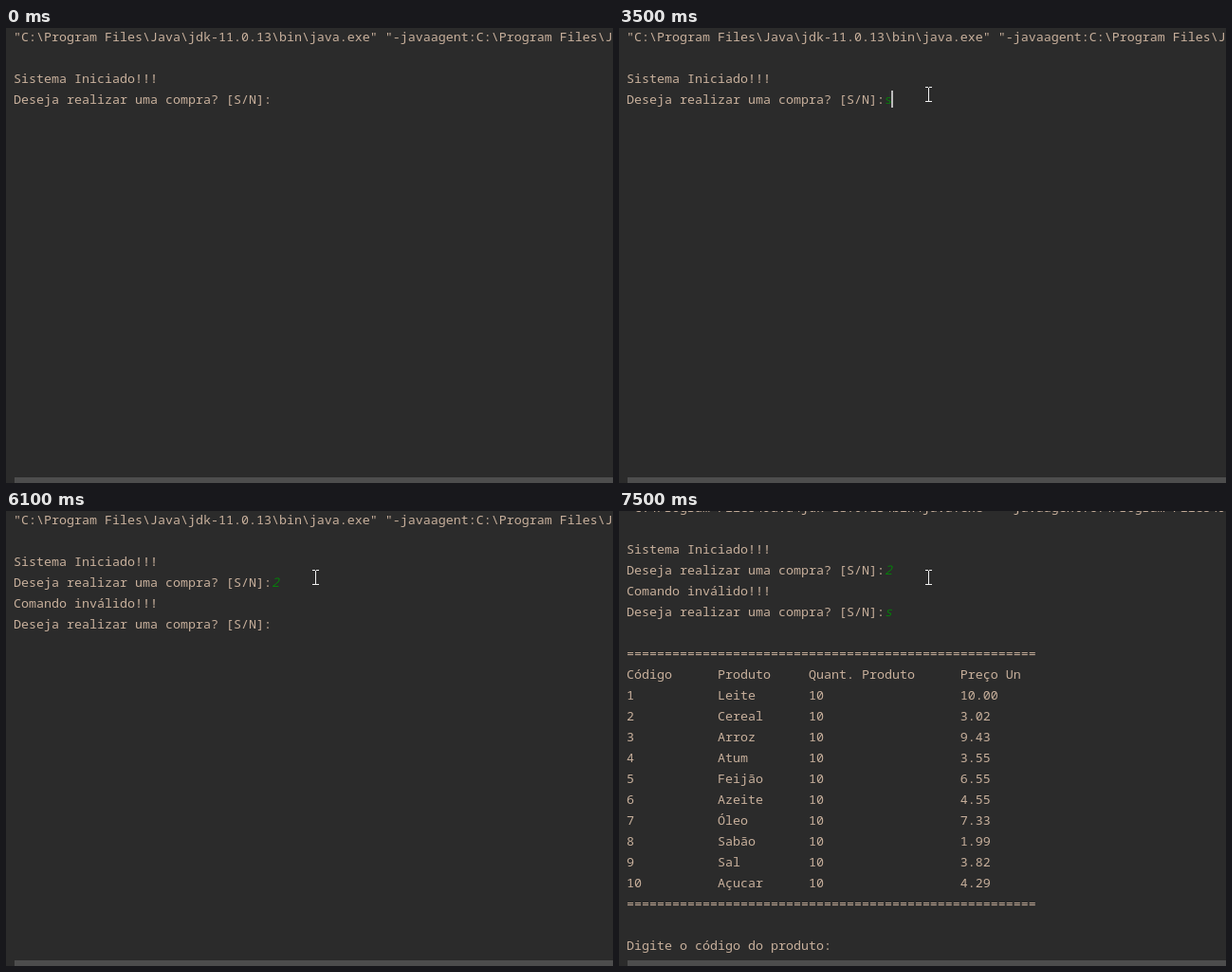
An HTML page with a canvas for the animation above (8000 ms loop, 640x480 px).

```html
<!DOCTYPE html>
<html lang="pt">
<head>
<meta charset="utf-8">
<style>
html, body { margin: 0; width: 100%; height: 100%; overflow: hidden; background: #2b2b2b; }
canvas { display: block; }
</style>
</head>
<body>
<canvas id="stage" width="640" height="480"></canvas>
<script>
const ctx = document.getElementById('stage').getContext('2d', { alpha: false });
const LOOP = 8000, CELL = 8, ROW = 22;
const FONT = '13.3333px "Noto Sans Mono", "DejaVu Sans Mono", monospace';
const ASK = 'Deseja realizar uma compra? [S/N]:';
const RULE = '='.repeat(54);
const columns = (a, b, c, d) => a.padEnd(12) + b.padEnd(12) + c.padEnd(20) + d;

const products = [
  ['Leite', '10.00'], ['Cereal', '3.02'], ['Arroz', '9.43'], ['Atum', '3.55'], ['Feijão', '6.55'],
  ['Azeite', '4.55'], ['Óleo', '7.33'], ['Sabão', '1.99'], ['Sal', '3.82'], ['Açucar', '4.29']
];
const lines = [
  '"C:\\Program Files\\Java\\jdk-11.0.13\\bin\\java.exe" "-javaagent:C:\\Program Files\\J',
  '', 'Sistema Iniciado!!!', ASK, 'Comando inválido!!!', ASK, '', RULE,
  columns('Código', 'Produto', 'Quant. Produto', 'Preço Un'),
  ...products.map(([name, price], i) => columns(String(i + 1), name, '10', price)),
  RULE, '', 'Digite o código do produto: '
];

// [start, printed lines, first answer, second answer, caret row, caret column (-1 = hidden)]
const states = [
  [0, 4, '', '', 3, -1],
  [900, 4, '', '', 3, 34],
  [1400, 4, '', '', 3, -1],
  [1800, 4, '', '', 3, 34],
  [2000, 4, 's', '', 3, 35],
  [2900, 4, 's', '', 3, -1],
  [3000, 4, '', '', 3, 34],
  [3500, 4, 's', '', 3, 35],
  [4100, 4, '', '', 3, 34],
  [4200, 4, '2', '', 3, 35],
  [4500, 4, '2', '', 4, 0],
  [4700, 6, '2', '', 5, 34],
  [5100, 6, '2', '', 5, -1],
  [5600, 6, '2', '', 5, 34],
  [6100, 6, '2', '', 5, -1],
  [6300, 6, '2', 's', 5, 35],
  [6700, 9, '2', 's', 9, 0],
  [6900, 22, '2', 's', 21, 28],
  [7500, 22, '2', 's', 21, -1]
];

function rect(color, x, y, w, h) {
  ctx.fillStyle = color;
  ctx.fillRect(x, y, w, h);
}

function text(str, col, row, color, style = '') {
  ctx.font = style + FONT;
  ctx.fillStyle = color;
  ctx.fillText(str, 8 + col * CELL, 14 + row * ROW);
}

function pointer(t) {
  if (t < 200) return;
  const p = Math.min(1, Math.floor((t - 200) / 100) / 6);
  const e = p * p * (3 - 2 * p), q = 1 - e;
  const x = Math.round(16 + 310 * e);
  const y = Math.round(8 * q * q + 2 * 150 * q * e + 70 * e * e);
  const color = '#f0f0f0';
  rect(color, x, y - 7, 1, 15);
  for (const end of [y - 8, y + 7]) {
    rect(color, x - 3, end, 3, 1);
    rect(color, x + 1, end, 3, 1);
  }
}

function draw(t) {
  const [, count, first, second, row, col] = states.findLast(s => s[0] <= t);
  rect('#2b2b2b', 0, 0, 640, 480);
  ctx.save();
  if (count === lines.length) ctx.translate(0, -13);
  lines.slice(0, count).forEach((line, i) => text(line, 0, i, '#c8b09c'));
  text(first, 34, 3, '#087a0c', t >= 4500 ? 'italic ' : '');
  text(second, 34, 5, '#087a0c', t >= 6700 ? 'italic ' : '');
  if (col >= 0) rect('#bbbbbb', 7 + col * CELL + (col ? 0 : 1), row * ROW, 2, 18);
  ctx.restore();
  pointer(t);
  rect('#4d4d4d', 9, 474, 631, 6);
}

function tick(now) {
  draw(now % LOOP);
  requestAnimationFrame(tick);
}
draw(0);
requestAnimationFrame(tick);
</script>
</body>
</html>
```
